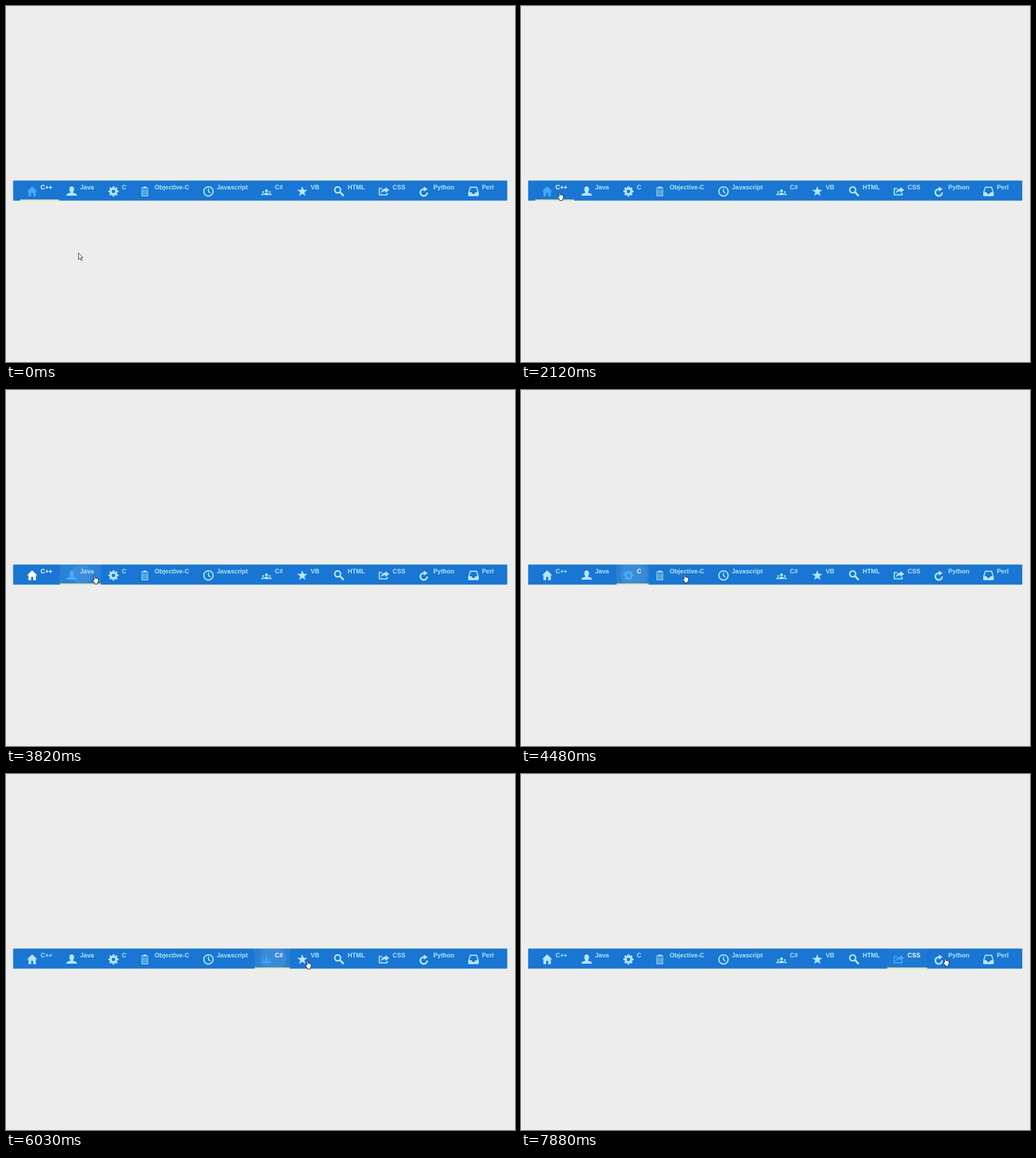
An HTML page that plays this animation: 895 px wide and 625 px high, repeating every 8 s.

```html
<!DOCTYPE html>
<html lang="en">
<head>
<meta charset="utf-8">
<title>Tab bar</title>
<style>
  html, body { margin: 0; width: 100%; height: 100%; overflow: hidden; background: #ededed; }
  svg { display: block; width: 895px; height: 625px; }
  text { font: bold 11px "Liberation Sans", Arial, sans-serif; }
  .line { fill: none; stroke: currentColor; }
</style>
</head>
<body>
<svg viewBox="0 0 895 625">
  <rect x="12.6" y="306.5" width="868.8" height="35.2" fill="#1976d2"/>
  <clipPath id="clip"><rect id="clipBox" y="307" height="34"/></clipPath>
  <rect id="tint" y="307" height="34" fill="#fff"/>
  <g clip-path="url(#clip)"><circle id="ripple" cy="324" fill="#fff"/></g>
  <g id="tabs"></g>
  <rect id="ink" y="339.8" height="1.8" fill="#ffff8d"/>
  <path id="arrow" d="M.5.5V12L3.2 9.6L5 13.6L6.8 12.8L5.1 8.9H8.4Z" fill="#fff" stroke="#15152a" stroke-width=".9"/>
  <path id="hand" d="M3 9V1.5Q4 0 5 1.5V5.5Q6 4.5 7 6Q8 5 9 6.5Q10.5 5.5 10.5 7.5V11L9 13.5V15.5H4V14L.7 9.5Q.5 7.8 2 8Z" fill="#fff" stroke="#111827" stroke-width=".9"/>
</svg>
<script>
const LOOP = 8000, FRAME = 130;
const PALE = [179, 229, 252], ACCENT = "#46aafa";
const $ = id => document.getElementById(id);
const clamp = v => Math.max(0, Math.min(1, v));
const set = (el, attrs) => { for (const k in attrs) el.setAttribute(k, attrs[k]); };

const fill = d => `<path fill="currentColor" d="${d}"/>`;
const line = (d, w) => `<path class="line" stroke-width="${w}" d="${d}"/>`;
const ring = (x, y, r, w) => `<circle class="line" cx="${x}" cy="${y}" r="${r}" stroke-width="${w}"/>`;
const disc = (x, y, r) => `<circle cx="${x}" cy="${y}" r="${r}" fill="currentColor"/>`;

function star() {
  const pts = Array.from({ length: 10 }, (_, i) => {
    const a = i * Math.PI / 5, r = i % 2 ? 3.9 : 9.6;
    return `${10 + r * Math.sin(a)} ${10.3 - r * Math.cos(a)}`;
  });
  return fill("M" + pts.join("L") + "Z");
}

function gear() {
  const teeth = Array.from({ length: 8 }, (_, i) =>
    `<rect x="8.3" y="1" width="3.4" height="4" rx=".6" fill="currentColor" transform="rotate(${i * 45} 10 10)"/>`);
  return ring(10, 10, 4.9, 3.8) + teeth.join("");
}

const icons = {
  home: fill("M10 1L1 9.8H3.5V18.5H8.2V12.5H11.8V18.5H16.5V9.8H19Z"),
  person: fill("M7.5 12.6V11C4.8 8 5.2 1.3 10 1.3S15.2 8 12.5 11V12.6C16 13.6 19.2 13.4 19.2 17.5H.8C.8 13.4 4 13.6 7.5 12.6Z"),
  gear: gear(),
  trash: fill("M1 3.3H4.8V1.4H10.2V3.3H14V4.8H1Z") + line("M2.6 6V17.8H12.4V6", 1.4) + line("M5.1 6.5V16M7.5 6.5V16M9.9 6.5V16", 1),
  clock: ring(10, 10, 8.2, 2.2) + line("M10 5V10.3L13.2 13", 1.9),
  group: disc(10, 9, 2.5) + disc(4.2, 11, 1.6) + disc(15.8, 11, 1.6) +
    fill("M5.6 16.4C5.6 13 8 12.2 10 12.2S14.4 13 14.4 16.4ZM.8 16.4C.8 14 2.4 13.2 4.6 13.2L5 16.4ZM19.2 16.4C19.2 14 17.6 13.2 15.4 13.2L15 16.4Z"),
  star: star(),
  search: ring(7.2, 7.3, 5.2, 2.7) + line("M11.4 11.4L17.8 18", 3.4),
  share: line("M6.5 5H1.4V16H15V12.5", 2) + fill("M12 2.4L19 7.4L12 12.4V9.7C8 9.7 6 11 4.4 13C4.8 8 8 5.3 12 5.2Z"),
  refresh: line("M14 12A6 6 0 1 1 8.6 6", 3) + fill("M8.2 1.4L15 6L8.2 10.6Z"),
  inbox: line("M4.5 2.7H15.5L18.3 12V17.4H1.7V12Z", 1.9) + fill("M1.5 11.6H6.6L7.8 14.2H12.2L13.4 11.6H18.5V18H1.5Z")
};

// label, left edge, icon
const tabs = [
  ["C++", 25, "home"], ["Java", 94.5, "person"], ["C", 168, "gear"], ["Objective-C", 225.5, "trash"],
  ["Javascript", 335, "clock"], ["C#", 437, "group"], ["VB", 500, "star"], ["HTML", 565, "search"],
  ["CSS", 644, "share"], ["Python", 715.5, "refresh"], ["Perl", 801, "inbox"]
].map(([label, x, icon], i, all) => {
  $("tabs").insertAdjacentHTML("beforeend",
    `<g><g transform="translate(${x + 11} 315.5)">${icons[icon]}</g>` +
    `<text x="${x + 35.7}" y="322" fill="currentColor">${label}</text></g>`);
  const group = $("tabs").lastChild;
  const end = i + 1 < all.length ? all[i + 1][1] : 870;
  return { x, width: end - x - 1, glyph: group.firstChild, text: group.lastChild };
});

// Pointer key points: time, x, y
const path = [
  [0, 127, 433], [1190, 127, 433], [1310, 121, 423], [1720, 64, 326], [2970, 65, 326], [3250, 74, 326],
  [3400, 128, 326], [3820, 152, 325], [4480, 284, 323], [4990, 402, 318], [5250, 401, 318],
  [5520, 486, 323], [6030, 526, 327], [6300, 545, 328], [6570, 625, 325], [7240, 663, 322],
  [7480, 704, 322], [7880, 742, 322]
];
const HAND_FROM = 1720;

function pointer(t) {
  const i = path.findLastIndex(p => p[0] <= t);
  const a = path[i], b = path[i + 1] || a;
  const span = b[0] - a[0];
  const steps = Math.max(1, Math.round(span / FRAME));
  const k = span ? Math.floor((t - a[0]) / span * steps) / steps : 0;
  return [1, 2].map(n => Math.round(a[n] + (b[n] - a[n]) * k));
}

// The first tab is pressed once, then the rest follow at an even pace
const FIRST = 2240, SECOND = 3820, PACE = 522.8;
function press(t) {
  if (t < FIRST) return { active: 0, age: Infinity };
  if (t < SECOND) return { active: 0, age: t - FIRST };
  const n = Math.floor((t - SECOND) / PACE);
  return { active: n + 1, age: t - SECOND - n * PACE };
}

const tone = k => `rgb(${PALE.map(v => Math.round(v + (255 - v) * k))})`;

function draw(t) {
  const { active, age } = press(t);
  const fade = clamp(age / 115);
  const { x, width } = tabs[active];

  tabs.forEach((tab, i) => {
    const on = i === active;
    const lit = on ? (active ? fade : 1) : i === active - 1 ? 1 - fade : 0;
    tab.text.style.color = tone(lit);
    tab.glyph.style.color = on ? ACCENT : tone(lit);
  });
  set($("ink"), { x, width });
  set($("clipBox"), { x, width });
  set($("tint"), { x, width, opacity: 0.08 * clamp((500 - age) / 400) });
  set($("ripple"), {
    cx: x + width / 2 + 2,
    r: Math.min(27, 18 + age * 0.042),
    opacity: 0.08 * clamp((270 - age) / 110)
  });

  const at = `translate(${pointer(t).join(" ")})`;
  const isHand = t >= HAND_FROM;
  set($("arrow"), { transform: at, visibility: isHand ? "hidden" : "visible" });
  set($("hand"), { transform: at, visibility: isHand ? "visible" : "hidden" });
}

const start = performance.now();
function loop() {
  draw((performance.now() - start) % LOOP);
  requestAnimationFrame(loop);
}
loop();
</script>
</body>
</html>
```
